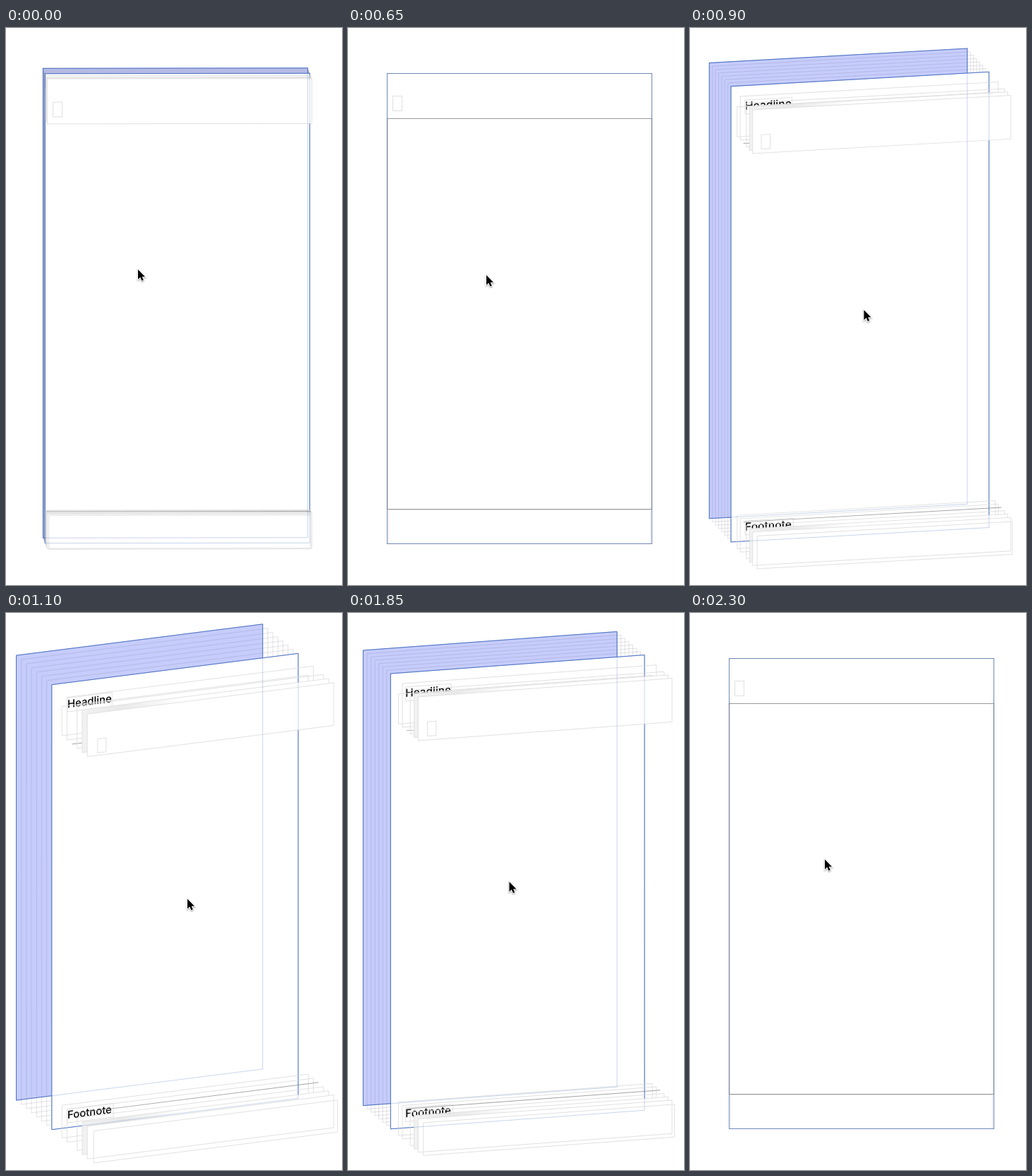
Animation, 476 px wide and 790 px high, one loop 2350 ms. Source, as an HTML page with a canvas:

```html
<!DOCTYPE html>
<html lang="en">
<head>
<meta charset="utf-8">
<title>Exploded view layers</title>
<style>
  html, body { margin: 0; width: 100%; height: 100%; overflow: hidden; background: #fff; }
  canvas { display: block; }
</style>
</head>
<body>
<canvas id="stage" width="476" height="790"></canvas>
<script>
const ctx = document.getElementById('stage').getContext('2d');
const LOOP = 2350, STEP = 50;
const WIDTH = 375, HEIGHT = 667, CENTER_X = 243, CENTER_Y = 398;
const LAYERS = 16, SPACING = 19.7, MAX_YAW = 21.4, MAX_PITCH = 18.9;
const BLUE = '#4a70c0', GRAY = '#e0e0e0', HAIRLINE = '#a2a2a2';
const HEADER_END = 64, FOOTER_START = 618;

function ease(time, start, end) {
  const u = Math.min(1, Math.max(0, (time - start) / (end - start)));
  return u * u * (3 - 2 * u);
}

// The view trails the pointer: it turns out, rests, and swings back
function poseAt(time) {
  const settling = Math.max(0, 1 - time / 100);
  const back = ease(time, 1690, 2200);
  const yaw = MAX_YAW * (ease(time, 650, 1090) - back) + 1.2 * settling;
  const pitch = MAX_PITCH * (ease(time, 650, 1018) - back) + 3.1 * settling;
  return [yaw, pitch].map(degrees => degrees * Math.PI / 180);
}

function cursorAt(time) {
  const drift = ease(time, 50, 500), back = ease(time, 1700, 2030);
  return [
    187 + 9 * drift + 61 * ease(time, 650, 990) - 66 * back,
    342 + 8 * drift + 55 * ease(time, 650, 960) - 56 * back
  ];
}

// Orthographic projection of one layer, with its top left corner as origin
function enterLayer(index, yaw, pitch) {
  const z = (index - (LAYERS - 1) / 2) * SPACING;
  ctx.setTransform(
    Math.cos(yaw), -Math.sin(yaw) * Math.sin(pitch), 0, Math.cos(pitch),
    CENTER_X + z * Math.sin(yaw), CENTER_Y + z * Math.cos(yaw) * Math.sin(pitch));
  ctx.translate(-WIDTH / 2, -HEIGHT / 2);
}

function box(x, y, w, h, stroke, fill) {
  if (fill) {
    ctx.fillStyle = fill;
    ctx.fillRect(x, y, w, h);
  }
  ctx.strokeStyle = stroke;
  ctx.strokeRect(x, y, w, h);
}

function screen(stroke, fill) {
  box(0, 0, WIDTH, HEIGHT, stroke, fill);
}

function bars(fill, headerStart = 0) {
  box(0, headerStart, WIDTH, HEADER_END - headerStart, GRAY, fill);
  box(0, FOOTER_START, WIDTH, HEIGHT - FOOTER_START, GRAY, fill);
}

function hairlines() {
  ctx.fillStyle = HAIRLINE;
  for (const y of [HEADER_END, FOOTER_START]) ctx.fillRect(0, y - .5, WIDTH, 1);
}

function label(text, y, width) {
  box(16, y, width, 20.5, GRAY);
  ctx.font = '500 16px Inter, sans-serif';
  ctx.fillStyle = '#000';
  ctx.fillText(text, 16, y + 14.3);
}

function backdrop() {
  const gradient = ctx.createLinearGradient(0, 0, 150, 0);
  gradient.addColorStop(0, '#f2f2f2');
  gradient.addColorStop(.4, '#e9e9e9');
  gradient.addColorStop(1, '#fff');
  return gradient;
}

function drawLayer(index) {
  switch (index) {
    case 0: return screen(BLUE, '#c6ccfb');
    case 7: return screen(BLUE, '#fff');
    case 8:
      label('Headline', 16, 68);
      return label('Footnote', 632, 70);
    case 9: return bars(null, 20);
    case 11: return hairlines();
    case 13: return bars(backdrop());
    case 14: return bars('#fff');
    case 15:
      box(8, 32, 13, 21, GRAY);
      return box(2, FOOTER_START + 1, WIDTH - 4, 48, GRAY);
    default: return index < 7 ? screen('rgba(110,110,130,.2)') : bars();
  }
}

function drawCursor(x, y) {
  ctx.setTransform(1, 0, 0, 1, x, y);
  const arrow = new Path2D('M0 .5V14.5L3.3 11.5L5.4 16.5L7.8 15.5L5.7 10.7H10Z');
  ctx.save();
  ctx.shadowColor = 'rgba(0,0,0,.4)';
  ctx.shadowBlur = 2;
  ctx.shadowOffsetY = 1;
  ctx.strokeStyle = '#fff';
  ctx.lineWidth = 2;
  ctx.stroke(arrow);
  ctx.restore();
  ctx.fillStyle = '#000';
  ctx.fill(arrow);
}

function render(now) {
  const time = Math.floor(now % LOOP / STEP) * STEP;
  const [yaw, pitch] = poseAt(time);
  const flat = Math.abs(yaw) + Math.abs(pitch) < 1e-6;

  ctx.resetTransform();
  ctx.fillStyle = '#fff';
  ctx.fillRect(0, 0, 476, 790);
  ctx.lineWidth = 1;
  for (let index = 0; index < LAYERS; index++) {
    enterLayer(index, yaw, pitch);
    drawLayer(index);
  }

  // Selected outlines shine through whatever covers them
  ctx.globalAlpha = flat ? 1 : .3;
  for (const index of [0, 7]) {
    enterLayer(index, yaw, pitch);
    screen(flat ? '#6f88b8' : BLUE);
  }
  ctx.globalAlpha = 1;
  if (flat) box(0, HEADER_END, WIDTH, FOOTER_START - HEADER_END, 'rgba(70,70,70,.45)');

  drawCursor(...cursorAt(time));
  requestAnimationFrame(render);
}
requestAnimationFrame(render);
</script>
</body>
</html>
```
